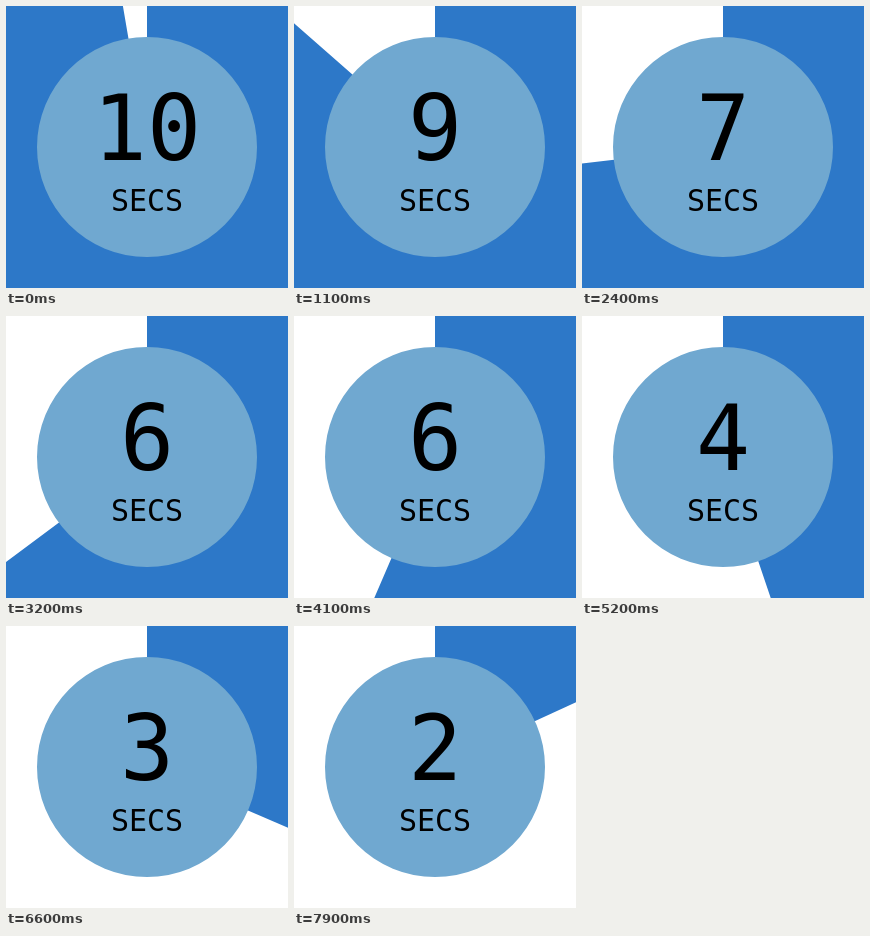
An HTML page with a canvas for the animation above (8 s loop, 282 px wide and 282 px high).

```html
<!DOCTYPE html>
<html>
<head>
<meta charset="utf-8">
<style>
  html, body { margin: 0; width: 100%; height: 100%; overflow: hidden; background: #fff; }
  canvas { display: block; }
</style>
</head>
<body>
<canvas id="stage" width="282" height="282"></canvas>
<script>
const ctx = document.getElementById('stage').getContext('2d');
const C = 141, LOOP = 8000, STEP = 100;
const BLUE = '#2d78c8', DISC = '#70a8d0';

function pie(radius, from, to, color) {
  ctx.fillStyle = color;
  ctx.beginPath();
  ctx.moveTo(C, C);
  ctx.arc(C, C, radius, from, to);
  ctx.fill();
}

function label(text, size, baseline) {
  ctx.fillStyle = '#000';
  ctx.font = `${size}px "DejaVu Sans Mono", monospace`;
  ctx.textAlign = 'center';
  ctx.fillText(text, C, baseline);
}

function draw(ms) {
  const frame = Math.floor(ms % LOOP / STEP);
  // The sweep ticks 12 times a second but is shown at 10 frames a second.
  const tick = Math.floor(1.2 * frame + 3.7);
  const gone = (3 * tick + 0.7) * Math.PI / 180;
  const top = -Math.PI / 2;

  ctx.fillStyle = '#fff';
  ctx.fillRect(0, 0, 2 * C, 2 * C);
  pie(300, top, top + 2 * Math.PI - gone, BLUE);
  pie(110, 0, 2 * Math.PI, DISC);
  label(Math.round(10 - (tick + 0.25) / 12), 90, 154);
  label('SECS', 30, 205);
}

const start = performance.now();
function loop() {
  draw(performance.now() - start);
  requestAnimationFrame(loop);
}
loop();
</script>
</body>
</html>
```
